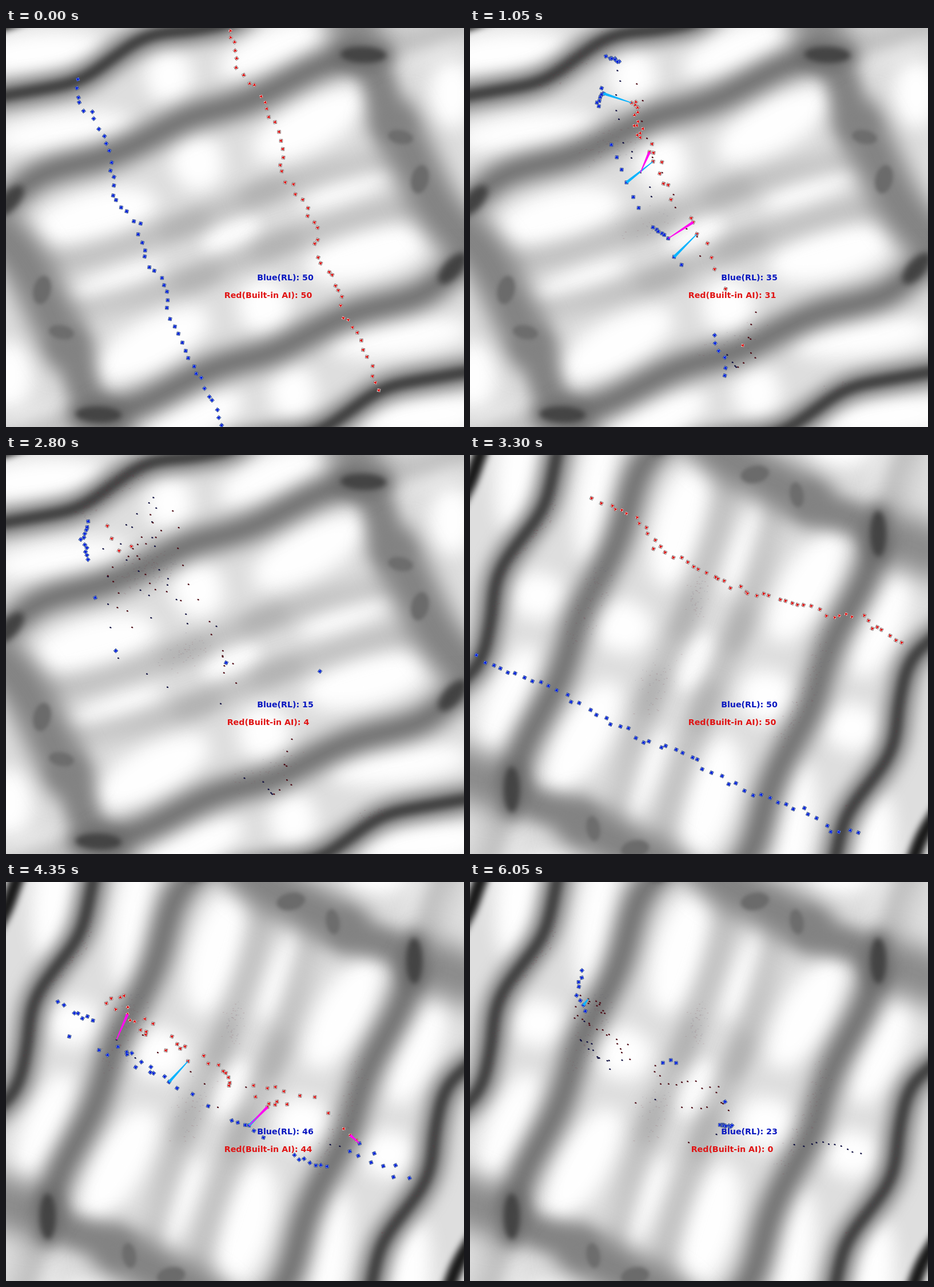
Recreate the animation shown at these times as an HTML page with a canvas. Size 801 px wide and 699 px high, loop 6100 ms.

```html
<!DOCTYPE html>
<html>
<head>
<meta charset="utf-8">
<style>
html, body { margin: 0; width: 100%; height: 100%; overflow: hidden; background: #ddd; }
canvas { display: block; }
</style>
</head>
<body>
<canvas id="stage" width="801" height="699"></canvas>
<script>
const LOOP = 6100, SWITCH = 3050, W = 801, H = 699, PAD = 80;
const ctx = document.getElementById('stage').getContext('2d');
const seeded = s => () => (s = s * 16807 % 2147483647) / 2147483647;
const grey = (v, a = 1) => `rgba(${v},${v},${v},${a})`;
const pairs = list => Array.from({ length: list.length / 2 }, (_, i) => ({ x: list[2 * i], y: list[2 * i + 1] }));
const dist = (a, b) => Math.hypot(a.x - b.x, a.y - b.y);
const mix = (a, b, f) => ({ x: a.x + (b.x - a.x) * f, y: a.y + (b.y - a.y) * f });

// ---- Terrain: one half is described, the other is its half-turn ----
const CX = 393.5, CY = 362;
const edge = [-60, 128, 60, 108, 115, 97, 150, 80, 190, 50, 230, 22, 270, 8, 330, 4, 400, -10, 440, -45, 470, -90];
const valley = [-20, 320, 10, 295, 50, 260, 100, 243, 170, 228, 230, 203, 280, 175, 330, 152, 390, 139, 440, 122, 500, 90, 560, 60, 625, 47];
const neck = [625, 47, 655, 90, 662, 140, 690, 191];
const pass = [665, 140, 694, 191, 728, 265, 752, 315, 795, 365, 840, 400];
const saddle = [700, 222, 540, 257, 450, 288, 310, 345, 240, 370, 150, 398, 60, 420];
const corner = [-60, 10, 0, -8, 40, -23, 100, -42, 160, -80];

function blob(g, blur, color, x, y, rx, ry, turn = 0) {
  g.filter = `blur(${blur}px)`;
  g.fillStyle = color;
  g.beginPath();
  g.ellipse(x, y, rx, ry, turn, 0, 7);
  g.fill();
}

function band(g, blur, color, width, list) {
  const p = pairs(list), end = p[p.length - 1];
  g.filter = `blur(${blur}px)`;
  g.strokeStyle = color;
  g.lineWidth = width;
  g.lineJoin = 'round';
  g.beginPath();
  g.moveTo(p[0].x, p[0].y);
  for (let i = 1; i < p.length - 1; i++) {
    const m = mix(p[i], p[i + 1], .5);
    g.quadraticCurveTo(p[i].x, p[i].y, m.x, m.y);
  }
  g.lineTo(end.x, end.y);
  g.stroke();
}

const layers = [
  g => {
    const hill = (...a) => blob(g, 16, grey(254), ...a);
    hill(55, 44, 120, 38, -.1);
    hill(285, 85, 42, 48);
    hill(465, 38, 100, 38, -.4);
    hill(100, 182, 125, 34, -.12);
    hill(530, 170, 110, 46, -.5);
    hill(335, 235, 46, 52, -.3);
    hill(155, 330, 112, 46, -.25);
    hill(600, 275, 95, 27, -.4);
    hill(390, 362, 50, 20, -.4);
    hill(780, 115, 40, 60);
    hill(740, 30, 60, 25, -.3);
  },
  g => {
    band(g, 16, grey(172, .65), 38, saddle);
    blob(g, 14, grey(165, .55), 312, 345, 50, 20, -.4);
    blob(g, 14, grey(165, .6), 452, 286, 48, 20, -.3);
  },
  g => {
    band(g, 20, grey(175), 40, [625, 47, 700, 28, 760, 8, 830, -20]);
    band(g, 22, grey(138), 90, [625, 47, 612, -10, 580, -80]);
    band(g, 14, grey(131), 60, neck);
    band(g, 19, grey(130), 84, pass);
    band(g, 17, grey(104), 47, valley);
    band(g, 14, grey(112), 46, edge);
    band(g, 6, grey(58, .88), 18, edge);
    band(g, 6, grey(24), 24, corner);
  },
  g => {
    blob(g, 12, grey(105, .8), 625, 47, 54, 26);
    blob(g, 5, grey(68), 625, 47, 40, 14, .03);
    blob(g, 3, grey(109), 690, 191, 22, 12, .2);
    blob(g, 3, grey(107), 724, 265, 15, 25, .2);
    blob(g, 6, grey(66), 6, 303, 34, 15, -.85);
  }
];

function terrain(orient) {
  const c = document.createElement('canvas');
  c.width = W + 2 * PAD;
  c.height = H + 2 * PAD;
  const g = c.getContext('2d');
  g.fillStyle = grey(222);
  g.fillRect(0, 0, c.width, c.height);
  for (const layer of layers)
    for (const turn of [0, Math.PI]) {
      g.setTransform(1, 0, 0, 1, PAD + CX, PAD + CY);
      orient(g);
      g.rotate(turn);
      g.translate(-CX, -CY);
      layer(g);
    }
  return c;
}

// ---- Formations: n things spaced along a route of key points, loosely scattered ----
const rnd = seeded(77), jitter = () => rnd() + rnd() - 1;

function along(route, f) {
  const steps = route.slice(1).map((p, i) => dist(route[i], p));
  let left = f * steps.reduce((a, b) => a + b, 0), i = 0;
  while (i < steps.length - 1 && left > steps[i]) left -= steps[i++];
  return steps.length ? mix(route[i], route[i + 1], left / steps[i]) : route[0];
}

function line(n, spread, ...points) {
  const route = pairs(points);
  return Array.from({ length: n }, (_, i) => {
    const p = along(route, n > 1 ? i / (n - 1) : .5);
    return { x: p.x + jitter() * spread, y: p.y + jitter() * spread };
  });
}

// Scorch marks: thin specks along a route, each appearing at its own moment
const scorch = (n, spread, ...points) => line(n, spread, ...points)
  .map(p => ({ ...p, w: 1 + rnd() * 2, red: rnd() < .6, when: rnd() }));

// Units keep their order along the front. Each round some drive on and the rest to a wreck.
function army(axis, firstLoss, begin, startLine, ...rounds) {
  const units = startLine.map(p => ({ path: [{ t: begin, ...p }], dies: Infinity }));
  const last = u => u.path[u.path.length - 1];
  let active = units, since = begin;
  for (const { t, alive, lost = [] } of rounds) {
    const from = Math.max(since, firstLoss), order = lost.map(p => [rnd(), p]).sort((a, b) => a[0] - b[0]);
    const fallen = order.map(([, p], i) => ({ ...p, t: from + (t - from) * (i + 1) / lost.length, dies: true }));
    const goals = [...alive.map(p => ({ ...p, t })), ...fallen].sort((a, b) => a[axis] - b[axis]);
    active.sort((a, b) => last(a)[axis] - last(b)[axis]).forEach((u, i) => {
      u.path.push(goals[i]);
      if (goals[i].dies) u.dies = goals[i].t;
    });
    active = active.filter(u => u.dies === Infinity);
    since = t;
  }
  return units;
}

const shifted = (list, dx, dy) => list.map(p => ({ x: p.x + dx, y: p.y + dy }));
const blueFront = line(50, 7, 46, 239, 90, 270, 190, 305, 270, 350, 350, 398, 415, 412, 470, 455, 540, 490, 605, 505, 680, 555, 726, 556);
const redFront = line(50, 8, 173, 183, 245, 215, 285, 270, 350, 300, 440, 345, 530, 362, 590, 385, 630, 385, 708, 435);

const scenes = [{
  ground: terrain(() => {}),
  blue: army('y', 550, 0,
    line(50, 8, 126, 87, 121, 116, 167, 185, 188, 245, 190, 305, 235, 350, 245, 410, 275, 450, 293, 520, 330, 590, 355, 640, 400, 735),
    { t: 1050,
      alive: [...line(8, 4, 239, 50, 262, 58), ...line(7, 5, 234, 108, 222, 136), ...line(6, 3, 245, 203, 296, 316),
        ...line(6, 2, 320, 349, 346, 368), ...line(2, 0, 357, 401, 370, 415), ...line(6, 7, 428, 538, 450, 610)],
      lost: [...line(11, 12, 256, 78, 270, 200, 320, 296), ...line(4, 8, 455, 575, 470, 598)] },
    { t: 1800,
      alive: [...line(3, 2, 206, 108, 207, 120), ...line(13, 7, 181, 162, 180, 195, 198, 239), ...line(4, 5, 240, 290, 258, 306),
        ...line(2, 0, 327, 491, 360, 487), ...line(1, 0, 475, 481)],
      lost: [...line(9, 12, 242, 84, 200, 150, 226, 195, 260, 284), ...line(3, 0, 368, 300, 368, 412, 417, 566)] },
    { t: 2800,
      alive: [...line(11, 4, 143, 118, 134, 150, 143, 183), ...line(2, 0, 156, 250, 192, 343), ...line(1, 0, 385, 364), ...line(1, 0, 549, 379)],
      lost: line(8, 10, 206, 125, 165, 180, 184, 241, 198, 356, 284, 410) }),
  red: army('y', 550, 0,
    line(50, 8, 390, -15, 408, 70, 450, 130, 478, 190, 480, 250, 540, 340, 545, 395, 588, 470, 590, 510, 628, 570, 650, 635),
    { t: 1050,
      alive: [...line(14, 14, 282, 128, 300, 190), ...line(9, 16, 318, 200, 345, 300), ...line(6, 14, 385, 325, 430, 415), ...line(2, 0, 447, 457, 477, 556)],
      lost: [...line(11, 10, 290, 98, 302, 180, 330, 250, 371, 337, 406, 402), ...line(8, 12, 490, 500, 500, 582, 468, 596)] },
    { t: 1800,
      alive: [...line(11, 16, 245, 150, 238, 230), ...line(3, 0, 322, 299, 309, 360, 334, 427)],
      lost: [...line(13, 12, 247, 97, 265, 135, 225, 165, 250, 230, 295, 250), ...line(4, 4, 377, 341, 383, 380)] },
    { t: 2800,
      alive: line(4, 3, 176, 123, 200, 174, 217, 161),
      lost: line(10, 10, 238, 150, 205, 180, 180, 212, 219, 300) }),
  marks: [...scorch(260, 20, 125, 98, 160, 75, 200, 40, 245, 18), ...scorch(140, 35, 205, 215, 285, 180), ...scorch(50, 35, 280, 360, 345, 330),
    ...scorch(50, 25, 400, 575, 510, 530), ...scorch(40, 12, 622, 636, 658, 624)],
  wear: t => (t - 250) / 1450
}, {
  ground: terrain(g => { g.rotate(.024); g.transform(0, -1, -1, 0, 0, 0); }),
  blue: army('x', 4200, SWITCH, shifted(blueFront, -70, 155),
    { t: 3800, alive: blueFront },
    { t: 5050,
      alive: [...line(7, 7, 160, 173, 162, 190), ...line(6, 5, 154, 281, 188, 315, 259, 320), ...line(5, 3, 378, 426, 410, 422), ...line(7, 3, 526, 503, 549, 500)],
      lost: [...line(12, 9, 188, 278, 215, 292, 250, 325), ...line(2, 0, 324, 381, 431, 442), ...line(11, 8, 572, 460, 612, 460, 683, 475)] },
    { t: 6050,
      alive: [...line(8, 5, 196, 155, 190, 200, 200, 226), ...line(3, 5, 337, 312, 359, 318), ...line(1, 0, 446, 385), ...line(11, 4, 438, 428, 457, 427)],
      lost: line(2, 0, 200, 244, 266, 312) }),
  red: army('x', 4200, SWITCH, shifted(redFront, 70, -155),
    { t: 3800, alive: redFront },
    { t: 5050,
      alive: [...line(9, 12, 197, 240, 235, 245, 314, 314), ...line(1, 0, 349, 399), ...line(3, 1, 466, 448, 492, 479)],
      lost: [...line(17, 9, 187, 200, 187, 240, 240, 260, 280, 305), ...line(16, 10, 318, 322, 330, 350, 425, 355, 450, 400), ...line(4, 5, 371, 394, 416, 397)] },
    { t: 6050,
      alive: [],
      lost: [...line(10, 12, 200, 204, 225, 215, 234, 235), ...line(3, 3, 276, 282, 269, 374, 383, 455)] }),
  marks: [...scorch(160, 10, 146, 60, 138, 110, 52, 210, 30, 330), ...scorch(110, 30, 235, 190, 180, 330), ...scorch(50, 25, 405, 220, 390, 280),
    ...scorch(50, 40, 335, 360, 315, 440), ...scorch(110, 22, 620, 320, 600, 400, 545, 500), ...scorch(140, 10, 755, 430, 735, 520, 655, 630)],
  wear: () => 1
}];

function place(u, t) {
  const p = u.path;
  let i = 1;
  while (i < p.length - 1 && t > p[i].t) i++;
  const a = p[i - 1], b = p[i], f = Math.min(1, (t - a.t) / (b.t - a.t));
  return { ...mix(a, b, f), turn: Math.atan2(b.y - a.y, b.x - a.x), dead: t >= u.dies, hittable: t < u.dies + 100 };
}

function drawUnit(p, light, rim, dark) {
  ctx.save();
  ctx.translate(p.x, p.y);
  ctx.rotate(p.turn);
  ctx.fillStyle = light;
  ctx.fillRect(-2.8, -2.8, 5.6, 5.6);
  ctx.strokeStyle = rim;
  ctx.lineWidth = .8;
  ctx.strokeRect(-2.8, -2.8, 5.6, 5.6);
  ctx.fillStyle = dark;
  ctx.beginPath();
  ctx.moveTo(3.2, 0);
  ctx.lineTo(-1.6, -2.6);
  ctx.lineTo(-1.6, 2.6);
  ctx.fill();
  ctx.restore();
}

function drawWreck(p, color) {
  ctx.fillStyle = color;
  ctx.fillRect(p.x - 1.4, p.y - 1.1, 2.2, 2.2);
  ctx.fillRect(p.x, p.y - .2, 1.6, 1.6);
}

// Tapered streak, wide at the gun
function beam(color, a, b) {
  const d = dist(a, b) || 1, nx = (a.y - b.y) / d, ny = (b.x - a.x) / d;
  ctx.fillStyle = color;
  ctx.beginPath();
  for (const [p, w] of [[a, 2.4], [b, .7], [b, -.7], [a, -2.4]]) ctx.lineTo(p.x + nx * w, p.y + ny * w);
  ctx.fill();
}

function fire(from, at, color, step) {
  from.forEach((p, i) => {
    if ((i * 7 + step * 3) % 9) return;
    const near = at.filter(q => dist(p, q) < 60).sort((a, b) => dist(p, a) - dist(p, b))[0];
    if (near) beam(color, p, near);
  });
}

function label(text, color, x, y) {
  ctx.fillStyle = color;
  ctx.fillText(text, x, y);
}

function frame(now) {
  const step = Math.floor(now % LOOP / 50), t = step * 50;
  const s = scenes[t < SWITCH ? 0 : 1];
  ctx.drawImage(s.ground, -PAD, -PAD);

  for (const m of s.marks) {
    if (m.when > s.wear(t)) continue;
    ctx.fillStyle = m.red ? 'rgba(120,45,60,.2)' : 'rgba(85,80,105,.17)';
    ctx.fillRect(m.x, m.y, m.w, 1);
  }

  const blue = s.blue.map(u => place(u, t)), red = s.red.map(u => place(u, t));
  const blues = blue.filter(p => !p.dead), reds = red.filter(p => !p.dead);

  ctx.font = 'bold 14.2px "DejaVu Sans", Verdana, sans-serif';
  ctx.textAlign = 'center';
  label(`Blue(RL): ${blues.length}`, '#0a18c0', 488.5, 442);
  label(`Red(Built-in AI): ${reds.length}`, '#e01414', 458.5, 473);

  for (const p of blue) if (p.dead) drawWreck(p, '#0a0a3c');
  for (const p of red) if (p.dead) drawWreck(p, '#4a0610');
  for (const p of blues) drawUnit(p, '#6a98f2', '#3a4a80', '#0414d8');
  for (const p of reds) drawUnit(p, '#eed4d4', '#867a7a', '#dc0808');

  // Guns fall silent for a few steps between salvos
  if ((step + 10) % 11 > 2) {
    fire(blues, red.filter(p => p.hittable), '#0bb4ff', step);
    fire(reds, blue.filter(p => p.hittable), '#ff0cf0', step + 1);
  }
}

const start = performance.now();
(function tick() {
  frame(performance.now() - start);
  requestAnimationFrame(tick);
})();
</script>
</body>
</html>
```
